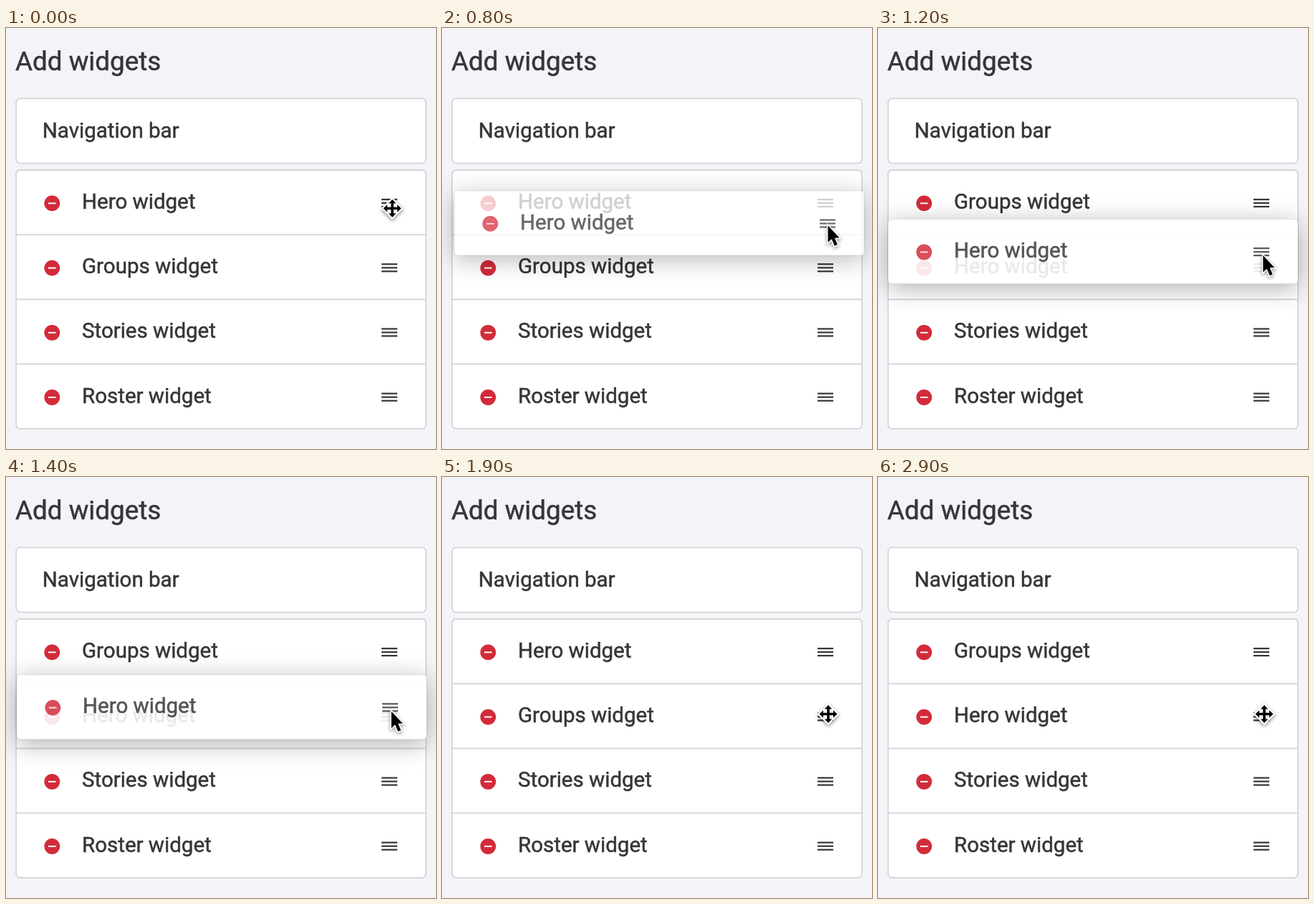
Recreate the animation shown at these times as an HTML page with a canvas. Size 600x587 px, loop 3700 ms.

```html
<!DOCTYPE html>
<html lang="en">
<head>
<meta charset="utf-8">
<title>Add widgets</title>
<style>
  html, body { margin: 0; width: 100%; height: 100%; overflow: hidden; background: #f4f3f8; }
  canvas { display: block; }
</style>
</head>
<body>
<canvas id="stage" width="600" height="587"></canvas>
<script>
const ctx = document.getElementById('stage').getContext('2d');

const LOOP = 3700, STEP = 100;
const PRESS = 600, LIFT = 700, SWAP = 1200, DROP = 1600, REFRESH = 2300;
const LEFT = 14, WIDTH = 572, ROW_TOP = 198, ROW_H = 90.2;
const INK = '#363538', LINE = '#d5d4d9', RED = '#d32b39';
const BEFORE = ['Hero', 'Groups', 'Stories', 'Roster'];
const AFTER = ['Groups', 'Hero', 'Stories', 'Roster'];

// The card follows the hand down an S-curve and fades in as it lifts
function dragAt(t) {
  const p = 1 / (1 + Math.exp((1080 - t) / 87));
  const x = t < SWAP ? 17 : Math.min(15, 14 + (t - SWAP) / 200);
  const y = 225 + 52 * p;
  return {
    x, y,
    alpha: Math.min(0.89, 0.4 + (t - LIFT) * 0.0037),
    tipX: 538.5 - (17 - x) * 0.4,
    tipY: y + 48.5 + 2.5 * p
  };
}

function text(str, x, y, size) {
  ctx.font = size + 'px Roboto, sans-serif';
  ctx.fillStyle = ctx.strokeStyle = INK;
  ctx.lineWidth = 0.5;
  ctx.fillText(str, x, y);
  ctx.strokeText(str, x, y);
}

function fillBox(x, y, w, h, r) {
  ctx.beginPath();
  ctx.roundRect(x, y, w, h, r);
  ctx.fillStyle = '#fff';
  ctx.fill();
}

function panel(y, h) {
  fillBox(LEFT, y, WIDTH, h, 6);
  ctx.strokeStyle = LINE;
  ctx.lineWidth = 1.8;
  ctx.stroke();
}

// Contents of one row, with the row's corner at (x, y)
function row(name, x, y) {
  const mid = y + 46.4;
  ctx.fillStyle = RED;
  ctx.beginPath();
  ctx.arc(x + 50.3, mid, 10.9, 0, Math.PI * 2);
  ctx.fill();
  ctx.fillStyle = '#fff';
  ctx.fillRect(x + 45, mid - 1, 10.6, 2);
  text(name + ' widget', x + 92, y + 54, 29.5);
  for (let i = -1; i <= 1; i++) {
    ctx.fillStyle = INK;
    ctx.fillRect(x + 510, mid - 1.4 + i * 5, 22, 2.2);
  }
}

function list(names) {
  panel(ROW_TOP, ROW_H * names.length);
  names.forEach((name, i) => {
    const y = ROW_TOP + i * ROW_H;
    if (i) {
      ctx.fillStyle = LINE;
      ctx.fillRect(LEFT, y - 0.9, WIDTH, 1.8);
    }
    row(name, LEFT, y);
  });
}

function dragCard({ x, y, alpha }) {
  const box = [x, y, WIDTH, 90, 5];
  // The shadow falls only outside the card
  ctx.save();
  ctx.globalAlpha = alpha;
  ctx.beginPath();
  ctx.rect(0, 0, 600, 587);
  ctx.roundRect(...box);
  ctx.clip('evenodd');
  ctx.shadowColor = 'rgba(0,0,0,0.36)';
  ctx.shadowBlur = 34;
  ctx.shadowOffsetY = 6;
  fillBox(...box);
  ctx.restore();

  ctx.save();
  ctx.globalAlpha = alpha;
  fillBox(...box);
  ctx.strokeStyle = 'rgba(0,0,0,0.12)';
  ctx.lineWidth = 1;
  ctx.stroke();
  ctx.globalAlpha = alpha * 0.94;
  row('Hero', x, y - 0.5);
  ctx.restore();
}

// Black shape with a white rim and a soft shadow
function pointer(points, x, y, rim) {
  ctx.save();
  ctx.translate(x, y);
  ctx.beginPath();
  points.forEach(p => ctx.lineTo(...p));
  ctx.closePath();
  ctx.lineWidth = rim;
  ctx.strokeStyle = '#fff';
  ctx.shadowColor = 'rgba(0,0,0,0.45)';
  ctx.shadowBlur = 5;
  ctx.shadowOffsetY = 2;
  ctx.stroke();
  ctx.shadowColor = 'transparent';
  ctx.fillStyle = '#000';
  ctx.fill();
  ctx.restore();
}

const ARROW = [[0, 0], [0, 23.5], [5.2, 18.7], [9.3, 28.2], [13.4, 26.5], [9.4, 17.2], [16, 17]];

// One arm of the four-way pointer, given four quarter turns
const ARM = [[-1.8, -1.8], [-1.8, -7], [-5.2, -7], [0, -12.5], [5.2, -7], [1.8, -7]];
const turn = ([x, y], n) => n ? turn([-y, x], n - 1) : [x, y];
const MOVE = [0, 1, 2, 3].flatMap(n => ARM.map(p => turn(p, n)));

function draw(t) {
  ctx.fillStyle = '#f4f3f8';
  ctx.fillRect(0, 0, 600, 587);
  text('Add widgets', 13, 59, 36.8);
  panel(98.4, 90.2);
  text('Navigation bar', 50.8, 152.5, 29.5);

  const swapped = (t >= SWAP && t < DROP) || t >= REFRESH;
  list(swapped ? AFTER : BEFORE);

  if (t >= LIFT && t < DROP) {
    const drag = dragAt(t);
    dragCard(drag);
    pointer(ARROW, drag.tipX, drag.tipY, 3);
  } else {
    const y = t < PRESS ? 251.5 : t < DROP ? 257 : 330.5;
    pointer(MOVE, 539, y, 4.5);
  }
}

function tick() {
  const t = performance.now() % LOOP;
  draw(Math.floor(t / STEP) * STEP);
  requestAnimationFrame(tick);
}
tick();
</script>
</body>
</html>
```
